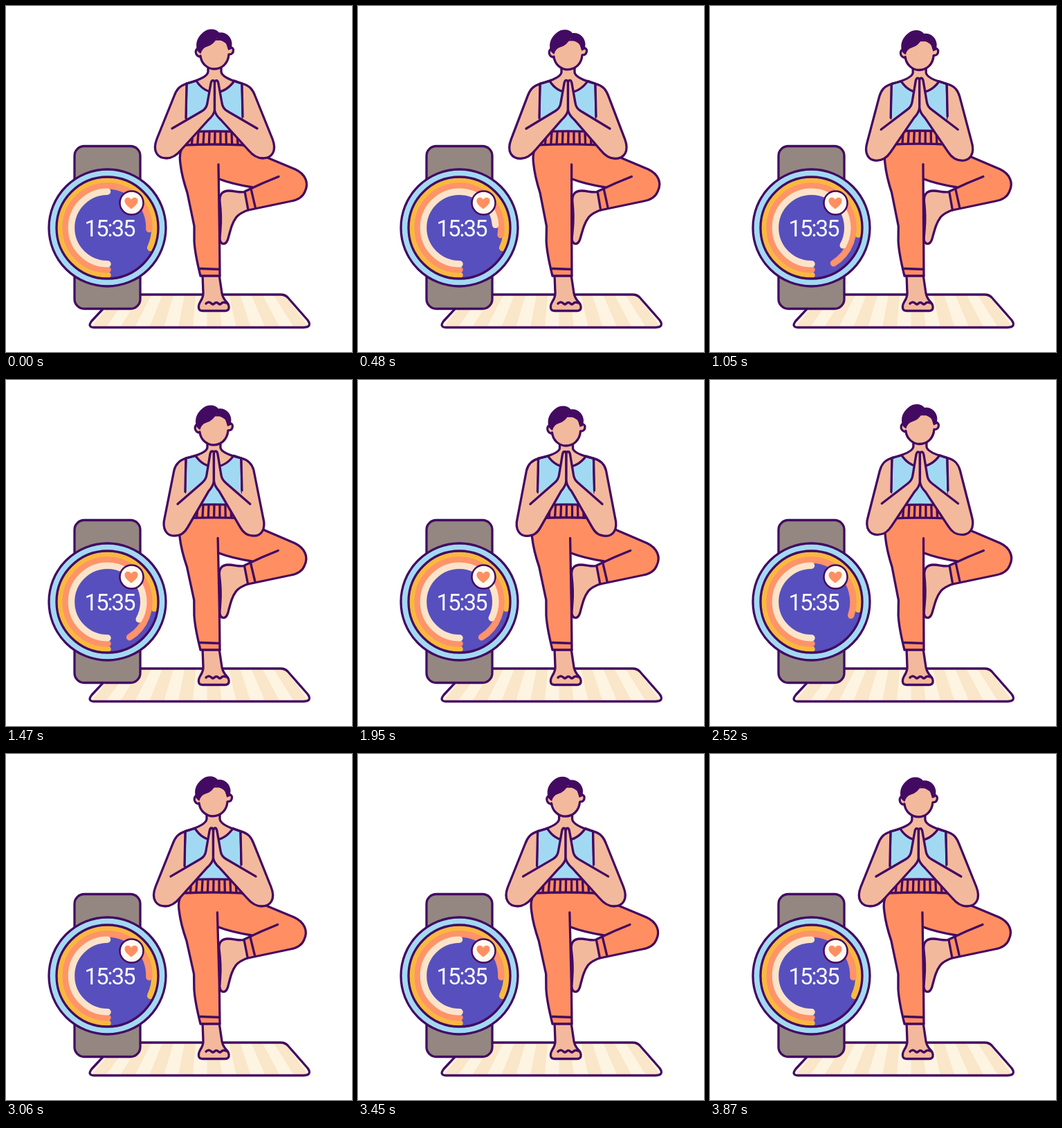
These frames come from a looping animation (500 by 500 pixels, 3.9 s). An HTML page:

```html
<!DOCTYPE html>
<html lang="en">
<head>
<meta charset="utf-8">
<title>Yoga with a smart watch</title>
<style>
  html, body { margin: 0; width: 100%; height: 100%; overflow: hidden; background: #fff; }
  svg { display: block; width: 100vw; height: 100vh; }
  path, line, circle, rect { stroke-linecap: round; stroke-linejoin: round; }
  .ink { stroke: #430a62; stroke-width: 3.3; }
  .none { fill: none; }
  .skin { fill: #f3b99d; }
  .pants { fill: #ff8f62; }
  .top { fill: #a2d9f2; }
  .hair { fill: #430a62; }
  .ring { fill: none; stroke-width: 9.5; }
  .clock {
    font: 400 33px Roboto, "Liberation Sans", sans-serif;
    letter-spacing: -2px; fill: #fff; text-anchor: middle;
  }
</style>
</head>
<body>
<svg viewBox="0 0 500 500">
  <defs>
    <clipPath id="matClip"><path d="M168,417 L397,417 Q403,417 407,421 L436,454 Q443,464 430,464.500 L127,464.500 Q117,464 124,455 L153,424 Q160,417 168,417 Z"/></clipPath>
  </defs>
  <g id="mat" clip-path="url(#matClip)"><rect x="110" y="410" width="340" height="60" fill="#fef4e2"/></g>
  <path class="ink none" d="M168,417 L397,417 Q403,417 407,421 L436,454 Q443,464 430,464.500 L127,464.500 Q117,464 124,455 L153,424 Q160,417 168,417 Z"/>

  <g id="person"></g>

  <rect class="ink" x="99" y="202.500" width="95" height="235" rx="14" fill="#948781"/>
  <circle class="ink" cx="146.500" cy="320.500" r="84.500" fill="#a2d9f2"/>
  <circle cx="146.500" cy="320.500" r="73.500" fill="#574fbd"/>
  <g id="rings"></g>
  <circle class="ink none" cx="146.500" cy="320.500" r="73.500"/>
  <text class="clock" x="149.500" y="332.500">15:35</text>
  <circle class="ink" cx="181.500" cy="284.500" r="17" fill="#fffaf3" style="stroke-width:2.500"/>
  <path class="pants" d="M181,293.500 C175,289 171.500,285.500 171.500,281.500 C171.500,276 178.500,275 181,280 C183.500,275 190.500,276 190.500,281.500 C190.500,285.500 187,289 181,293.500 Z"/>
</svg>
<script>
const LOOP = 3900, STEP = 30;
const NS = 'http://www.w3.org/2000/svg';
const clamp = v => Math.max(0, Math.min(1, v));
const mix = (a, b, k) => a + (b - a) * k;
const smooth = k => k * k * (3 - 2 * k);

function add(parent, cls, attrs = {}) {
  const el = document.createElementNS(NS, 'path');
  el.setAttribute('class', cls);
  for (const k in attrs) el.setAttribute(k, attrs[k]);
  return document.getElementById(parent).appendChild(el);
}

// Eased steps between [time, value] pairs
function ease(steps, t) {
  for (let i = 1; i < steps.length; i++) {
    const [t0, v0] = steps[i - 1], [t1, v1] = steps[i];
    if (t < t1) return mix(v0, v1, smooth(clamp((t - t0) / (t1 - t0))));
  }
  return steps[steps.length - 1][1];
}

// Smooth periodic curve through [time, value] pairs
function curve(pts, t) {
  const n = pts.length;
  const at = i => {
    const p = pts[(i + n) % n];
    return [p[0] + Math.floor(i / n) * LOOP, p[1]];
  };
  const slope = i => (at(i + 1)[1] - at(i - 1)[1]) / (at(i + 1)[0] - at(i - 1)[0]);
  let i = n - 1;
  while (i > 0 && pts[i][0] > t) i--;
  const [t0, v0] = at(i), [t1, v1] = at(i + 1);
  const d = t1 - t0, k = (t - t0) / d, s = smooth(k);
  return mix(v0, v1, s) + d * k * (1 - k) * ((1 - k) * slope(i) - k * slope(i + 1));
}

const SWAY = [[0, 0], [480, 2], [750, 2.3], [1050, 1.2], [1550, -1.3], [1950, -0.5],
              [2350, 2], [2520, 1.9], [3060, -2], [3300, -1.8]];
const NOD = [[0, 0], [480, 0.8], [1050, 1.5], [1950, 4], [2520, 1.5], [3060, -1.2]];
const BREATH = [[0, 0], [200, 0], [1650, 1], [2170, 1], [3080, 0]];

// Mat stripes
for (let i = 0; i < 15; i += 2) {
  const lo = k => 122 + k * 21.1, hi = k => 163 + k * 15.9;
  add('mat', '', { fill: '#fae6c8',
    d: `M${hi(i)},416 L${hi(i + 1)},416 L${lo(i + 1)},466 L${lo(i)},466 Z` });
}

// Watch rings: radius, colour, end angle over time (degrees from the top)
const rings = [
  [68.5, '#f8b93f', [[0, 115], [470, 115], [1040, 98], [2430, 98], [3030, 115]]],
  [60.5, '#ff9369', [[0, 92], [340, 92], [940, 148], [2140, 148], [2740, 92]]],
  [52.3, '#fbe4c9', [[0, 0], [90, 0], [690, 119], [1900, 119], [2500, 0]]]
].map(([r, color, ends]) => ({ r, ends, el: add('rings', 'ring', { stroke: color }) }));

function arc(r, end) {
  const a = end * Math.PI / 180, x = 146.5 + r * Math.sin(a), y = 320.5 - r * Math.cos(a);
  return `M147,${320.5 + r} A${r},${r} 0 0 1 146.5,${320.5 - r} A${r},${r} 0 0 1 ${x},${y}`;
}

// Person, back to front
const shapes = [];
const part = (cls, d) => shapes.push({ d, el: add('person', cls) });

part('ink skin', 'M284,388 L285,415 Q285,421 281,427 Q277,434 279,438 Q280,440.5 284,440.5 L316,440.5 Q321,440.5 322,437 Q323,432 318,427 Q313,421 312,415 L308,388 Z');
part('ink none', 'M289,430 Q293,426 297,430 Q299,432 301,430 Q304,427 307,430 Q309,432 311,430 Q314,427 318,429');
part('ink skin', 'M348,268 C338,271 332,267 322,267 C312,267 308,273 309,283 C311,300 311,310 310,322 L309,336 Q309.5,344 315,343.5 Q319,343 321,336 C325,321 327,313 333,305 Q338,299 352,294 Z');
part('pants', 'M259,200 L343,200 Q360,212 375,218 L418,236 C433,243 438,256 432,268 Q428,279 412,282 L350,295 L345,268 L355,262 Q325,258 308,250 L309,390 L281,390 L272,345 L272,318 L262,270 L252,228 Q249,208 259,200 Z');
part('ink none', 'M309,390 L281,390 Q273,358 272,340 L272,318 L262,270 Q254,246 252,228 Q249,208 259,200');
part('ink none', 'M307,229 L308.5,330 L309,390 M281,379.5 L309,380.5');
part('ink none', 'M343,201 Q360,212 375,218 L418,236 C433,243 438,256 432,268 Q428,279 412,282 L350,295 L345,268 L371,256 Q383,251 394,246.5');
part('ink none', 'M308,250 Q326,257 356,262 M354,264 L360.5,292');

part('skin', 'M292,84 L292,95 Q291,104 261,112 L261,150 L341,150 L341,112 Q312,104 311,95 L311,84 Z');
part('ink top', 'M261,112 L275,108 Q285,124 302,125 Q319,124 330,108 L341,112 L343,182 L259,182 Z');
part('ink pants', 'M260,182 Q301,180 343,182 L344,201 Q301,199 259,201 Z');
let bars = '';
for (let i = 0; i < 9; i++) bars += `M${270 + i * 8},183 L${268.5 + i * 8.3},199 `;
part('ink none', bars);
part('ink none', 'M292,87 L292,95 Q291,104 261,112 M311,87 L311,95 Q312,104 341,112');

// Arms in open and closed pose; the right one is mirrored
const OPEN = 'M262,112 C250,115 246,122 243,130 L218,192 C211,210 219,220 232,220 C242,220 248,214 253,208 L292,165 Q301,157 301.5,150 L301.5,113 C301.5,106 297,106 296,112 L291,140 Q290,148 283,152 L240,177';
const SHUT = 'M262,112 C250,115 246,122 244,130 L231,200 C226,219 236,226 244,226 C255,226 260,221 264,214 L294,161 Q301,153 301.5,145 L301.5,105 C301.5,99 297,99 296,105 L291,137 Q290,144 284,149 L249.5,180.5';
const PAIR = /(-?[\d.]+),(-?[\d.]+)/g;
const mapPath = (d, fn) => d.replace(PAIR, (_, x, y) => fn(+x, +y).map(v => v.toFixed(2)).join());
const arms = [false, true].map(flip => ({
  flip, fill: add('person', 'skin'), line: add('person', 'ink none')
}));

// Head
part('ink skin', 'M281,62 C274,58 271,70 279,73 Q281,73 281,72 C282,83 291,91 301,91 C312,91 321,83 322,70 Q329,70 328.5,63 Q327,58 322,61 L318,48 L290,48 Z');
part('hair', 'M276,64 C273,51 278,44 285,38 C292,32 303,32 308,38.5 C318,37 326,45 326.5,54 L326,62 L321,64 Q321,55 314,51.5 Q308,49 305,46 Q300,56 291,58.5 Q283,61 281.5,69 Q278,67 276,64 Z');

function armPath(k, flip) {
  const shut = [...SHUT.matchAll(PAIR)];
  let i = 0;
  return mapPath(OPEN, (x, y) => {
    const [, sx, sy] = shut[i++];
    const px = mix(x, +sx, k);
    return [flip ? 603 - px : px, mix(y, +sy, k)];
  });
}

function draw(t) {
  const sway = curve(SWAY, t), nod = curve(NOD, t), breath = ease(BREATH, t);
  const chest = nod * 0.35, hip = -1.5 * breath;
  const shift = y => y < 93 ? nod
    : y < 112 ? mix(nod, chest, (y - 93) / 19)
    : y < 190 ? mix(chest, hip, (y - 112) / 78)
    : mix(hip, 0, clamp((y - 190) / 60));
  // The feet stay planted while the upper body sways
  const bend = (x, y) => [x + sway * clamp((350 - y) / 150), y + shift(y)];

  for (const s of shapes) s.el.setAttribute('d', mapPath(s.d, bend));
  for (const { flip, fill, line } of arms) {
    const d = armPath(breath, flip);
    const side = flip ? 'L342,165 L341,112 Z' : 'L260,165 L261,112 Z';
    const body = d.slice(0, d.lastIndexOf('L'));
    fill.setAttribute('d', mapPath(body + side, bend));
    const seam = flip ? ' M341,112 L342,160' : ' M261,112 L260,162';
    line.setAttribute('d', mapPath(d + seam, bend));
  }
  for (const { r, ends, el } of rings) el.setAttribute('d', arc(r, ease(ends, t)));
}

const start = performance.now();
function tick() {
  const t = (performance.now() - start) % LOOP;
  draw(Math.floor(t / STEP) * STEP);
  requestAnimationFrame(tick);
}
tick();
</script>
</body>
</html>
```
